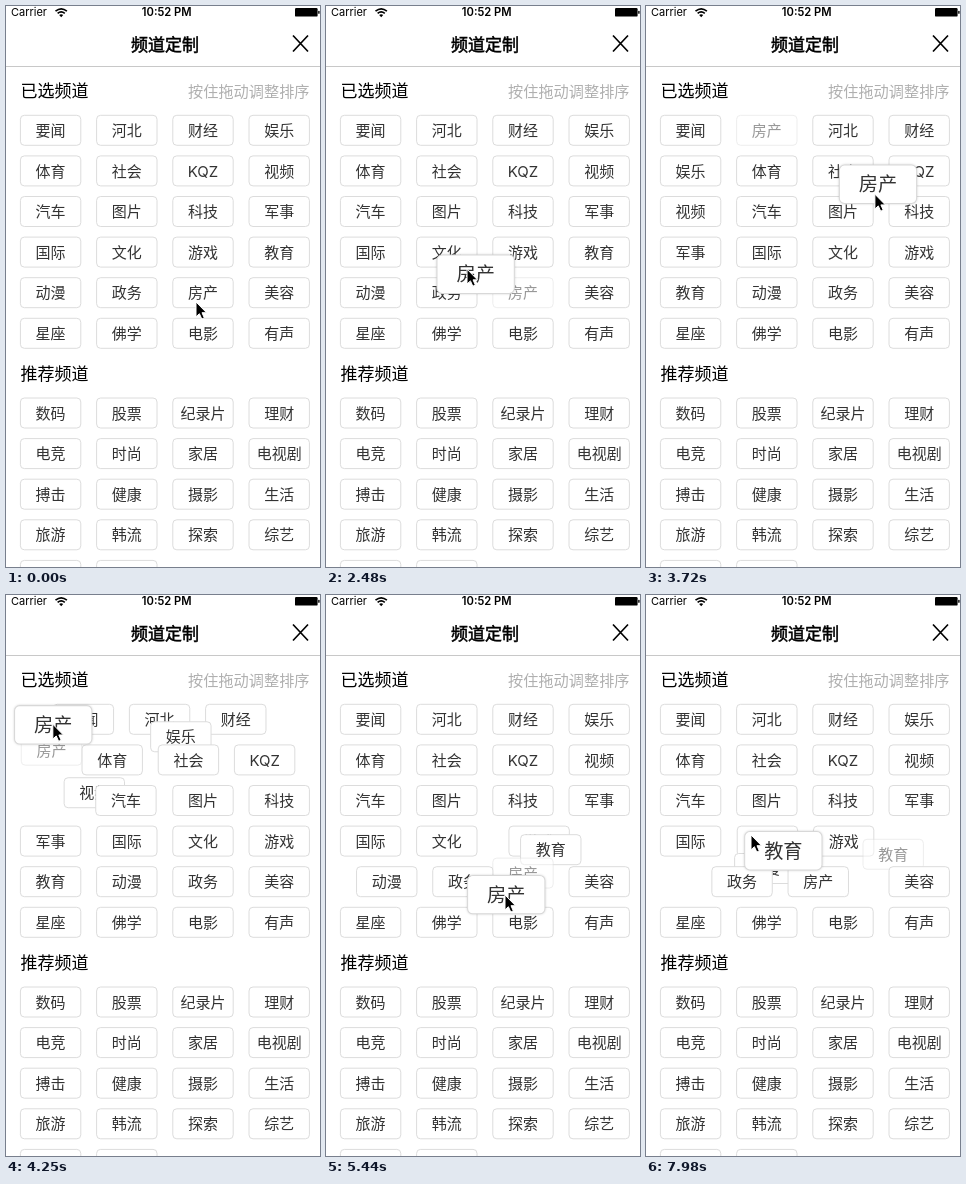
An HTML page for the animation above (8000 ms loop, 314 by 561 pixels).

```html
<!DOCTYPE html>
<html lang="zh-CN">
<head>
<meta charset="utf-8">
<title>频道定制</title>
<style>
  html, body { margin: 0; width: 100%; height: 100%; overflow: hidden; background: #fff; }
  svg { display: block; width: 100vw; height: 100vh; font-family: Inter, "Noto Sans CJK SC", "Noto Sans CJK", sans-serif; }
  .cell rect { fill: #fff; stroke: #dcdcdc; }
  .cell text { font-size: 15px; fill: #333; text-anchor: middle; }
  .card rect { stroke: #d8d8d8; stroke-width: .8; filter: drop-shadow(0 .5px 1px rgba(0, 0, 0, .16)); }
  .head { font-size: 17px; }
  .title { text-anchor: middle; stroke: #000; stroke-width: .5px; }
</style>
</head>
<body>
<svg viewBox="0 0 314 561">
  <g id="status">
    <text x="5" y="10.3" font-size="11">Carrier</text>
    <path d="M49.5 5.2Q55.2 .4 60.9 5.2M51.6 7.4Q55.2 4.4 58.8 7.4" fill="none" stroke="#000" stroke-width="1.6"/>
    <path d="M53.2 9Q55.2 7.4 57.2 9L55.2 11.2Z"/>
    <text x="160.7" y="10.3" font-size="11.2" font-weight="600" text-anchor="middle">10:52 PM</text>
    <rect x="289" y="2" width="22.6" height="8.6" rx="1.2"/>
    <rect x="312.2" y="4.8" width="1.4" height="3" rx=".6"/>
  </g>
  <text x="159" y="44.6" class="head title">频道定制</text>
  <path d="M287 29.5L302 45.5M302 29.5L287 45.5" stroke="#000" stroke-width="1.7"/>
  <path d="M0 60.5H314" stroke="#c8c8c8"/>
  <text x="14.5" y="91.3" class="head">已选频道</text>
  <text x="303.5" y="90.6" font-size="15.2" fill="#b0b0b0" text-anchor="end">按住拖动调整排序</text>
  <text x="14.5" y="373.8" class="head">推荐频道</text>
  <g id="cells"></g>
  <path id="cursor" d="M0 0V14.8L3.4 11.7L5.8 17L8.3 15.9L6 10.7H10.5Z" stroke="#fff" stroke-linejoin="round"/>
</svg>
<script>
const LOOP = 8000, SHIFT = 300, LIFT = 200, LAG = 60, ZOOM = 1.28;
const COLS = 4, PITCH_X = 76.2, PITCH_Y = 40.6, HALF_W = 30.2, HALF_H = 15;

const chosen = ('要闻 河北 财经 娱乐 体育 社会 KQZ 视频 汽车 图片 科技 军事 ' +
  '国际 文化 游戏 教育 动漫 政务 房产 美容 星座 佛学 电影 有声').split(' ');
const suggested = ('数码 股票 纪录片 理财 电竞 时尚 家居 电视剧 ' +
  '搏击 健康 摄影 生活 旅游 韩流 探索 综艺').split(' ').concat('', '');

// turning points of the pointer: time, x, y
const path = [
  [0, 190, 296], [570, 190, 296], [830, 204, 290], [2150, 204, 290],
  [2500, 140, 262], [2890, 134, 246], [2950, 122, 224], [3300, 118, 106],
  [3450, 158, 142], [3580, 230, 146], [3660, 232, 178], [3720, 229, 188],
  [3870, 110, 217], [3920, 70, 205], [4090, 48, 131], [4540, 46, 128],
  [4740, 53, 210], [4800, 57, 219], [4880, 160, 229], [5000, 182, 250],
  [5180, 183, 274], [5260, 184, 297], [5440, 179, 300], [5640, 183, 298],
  [6060, 272, 240], [7650, 272, 240], [7830, 215, 276], [7920, 138, 256], [7980, 105, 240]
];

const drags = [
  { label: '房产', start: 1940, end: 5600 },
  { label: '教育', start: 7370, end: LOOP + LIFT }
];

const ease = v => (v = Math.min(1, Math.max(0, v)), v * v * (3 - 2 * v));
const mix = (a, b, k) => a + (b - a) * k;
const mixPoint = (p, q, k) => [mix(p[0], q[0], k), mix(p[1], q[1], k)];
const slot = (i, top = 124.3) => [44.6 + PITCH_X * (i % COLS), top + PITCH_Y * Math.floor(i / COLS)];

// monotone cubic through the turning points
function pointer(t) {
  const next = path.findIndex(k => k[0] > t);
  if (next < 0) return path.at(-1).slice(1);
  const i = next - 1, span = path[next][0] - path[i][0], u = (t - path[i][0]) / span;
  const along = d => {
    const slope = j => path[j] && path[j + 1] ? (path[j + 1][d] - path[j][d]) / (path[j + 1][0] - path[j][0]) : 0;
    const tangent = j => {
      const a = slope(j - 1), b = slope(j);
      return a * b > 0 ? 2 * a * b / (a + b) : 0;
    };
    return mix(path[i][d], path[next][d], ease(u)) +
      span * u * (1 - u) * ((1 - u) * tangent(i) - u * tangent(next));
  };
  return [along(1), along(2)];
}

const held = t => pointer(Math.max(0, t - LAG));

function slotAt([x, y]) {
  return chosen.findIndex((_, i) => {
    const [cx, cy] = slot(i);
    return Math.abs(x - cx) < HALF_W && Math.abs(y - cy) < HALF_H;
  });
}

// overlapping shifts add up
const shifts = chosen.map(() => []);
function position(item, t) {
  let [x, y] = slot(item);
  for (const s of shifts[item]) {
    const k = ease((t - s.t) / SHIFT);
    x += s.dx * k;
    y += s.dy * k;
  }
  return [x, y];
}

// a dragged channel takes the slot under the centre of its card
let order = chosen.map((_, i) => i);
function moveTo(item, target, t) {
  const next = order.filter(i => i !== item);
  next.splice(target, 0, item);
  next.forEach((i, now) => {
    const before = order.indexOf(i);
    if (before === now) return;
    const [x0, y0] = slot(before), [x1, y1] = slot(now);
    shifts[i].push({ t, dx: x1 - x0, dy: y1 - y0 });
  });
  order = next;
}
for (const d of drags) {
  d.item = chosen.indexOf(d.label);
  for (let t = d.start; t < Math.min(d.end, LOOP); t += 5) {
    const target = slotAt(held(t));
    if (target >= 0 && order[target] !== d.item) moveTo(d.item, target, t);
  }
}

const layer = document.getElementById('cells');
const cursor = document.getElementById('cursor');

function addCell(label, kind = '') {
  const g = document.createElementNS('http://www.w3.org/2000/svg', 'g');
  g.setAttribute('class', 'cell ' + kind);
  g.innerHTML = `<rect x="${-HALF_W}" y="${-HALF_H}" width="${2 * HALF_W}" height="${2 * HALF_H}" rx="4"/>` +
    `<text y="5.6">${label}</text>`;
  return layer.appendChild(g);
}
const place = (el, [x, y], scale = 1) =>
  el.setAttribute('transform', `translate(${x.toFixed(2)} ${y.toFixed(2)}) scale(${scale})`);

suggested.forEach((label, i) => place(addCell(label), slot(i, 407)));
const cells = chosen.map(label => addCell(label));
for (const d of drags) d.card = addCell(d.label, 'card');

function draw(t) {
  cells.forEach((el, i) => {
    place(el, position(i, t));
    el.setAttribute('opacity', 1);
  });
  for (const { item, start, end, card } of drags) {
    const active = t >= start && t < end + LIFT;
    card.style.display = active ? '' : 'none';
    if (!active) continue;
    const raised = t < end ? ease((t - start) / LIFT) : 1 - ease((t - end) / LIFT);
    place(card, mixPoint(position(item, t), held(Math.min(t, end)), raised), mix(1, ZOOM, raised));
    cells[item].setAttribute('opacity', .5);
  }
  place(cursor, pointer(t));
}

const origin = performance.now();
function tick() {
  draw((performance.now() - origin) % LOOP);
  requestAnimationFrame(tick);
}
tick();
</script>
</body>
</html>
```
